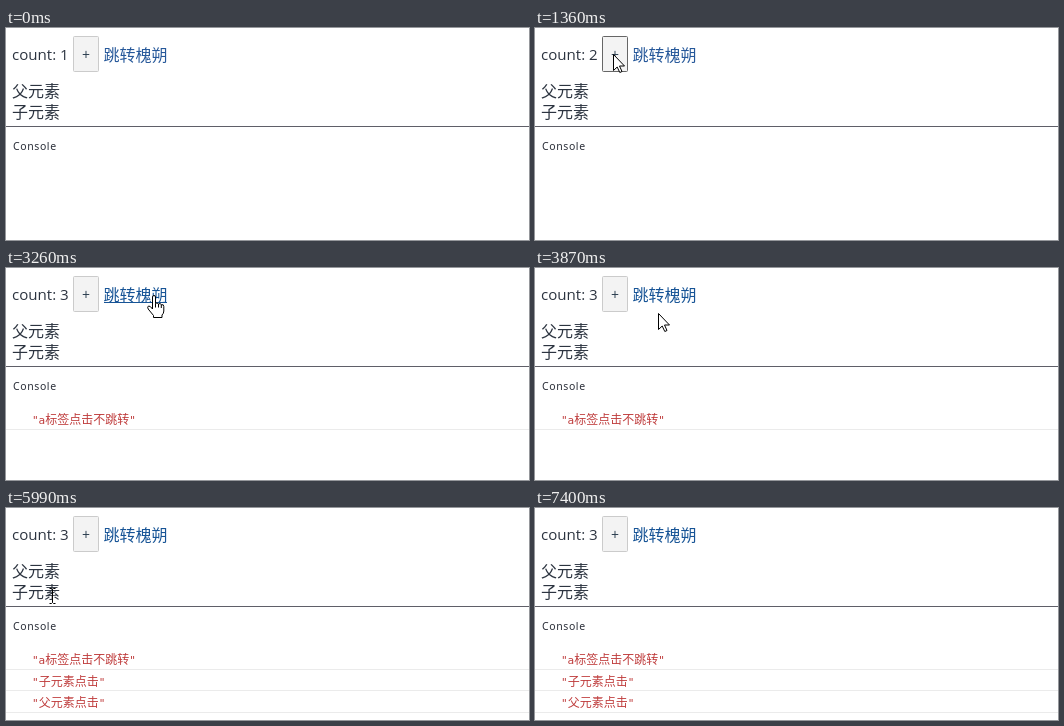
Animation, 523 px wide and 212 px high, one loop 8000 ms. Source, as an HTML page:

```html
<!DOCTYPE html>
<html lang="zh-CN">
<head>
<meta charset="utf-8">
<title>Event modifiers</title>
<style>
  html, body { margin: 0; width: 100%; height: 100%; overflow: hidden; background: #fff; }
  svg { display: block; width: 523px; height: 212px; cursor: default; }
  text { font: 16px "Noto Sans CJK SC", "Noto Sans CJK", sans-serif; fill: #2c3440; }
  .latin { font: 15.1px "Open Sans", "Noto Sans", sans-serif; }
  .plus { font: 14px "Open Sans", "Noto Sans", sans-serif; fill: #2c3e50; text-anchor: middle; }
  .title { font: 500 10.5px "Noto Sans", "Open Sans", sans-serif; letter-spacing: .6px; fill: #2c303a; }
  .log text { font: 11px "DejaVu Sans Mono", monospace; fill: #bf3c3c; }
  .log tspan { font: 12px "Noto Sans CJK SC", "Noto Sans CJK", sans-serif; }
  .log rect { fill: #ebebeb; }
  #cursor path { fill: #fff; stroke: #000; stroke-linejoin: round; }
  #cursor #beam { fill: none; stroke-linejoin: miter; }
</style>
</head>
<body>
<svg viewBox="0 0 523 212">
  <text id="count" class="latin" x="6" y="32">count: 1</text>
  <rect id="button" x="67.5" y="8.5" width="25" height="35" rx="1"/>
  <text class="plus" x="80" y="32">+</text>
  <g id="link">
    <text x="97.5" y="32.5" style="fill: inherit">跳转槐朔</text>
    <rect id="underline" x="98" y="34" width="63" height="1"/>
  </g>
  <text x="6" y="69">父元素</text>
  <text x="6" y="90">子元素</text>

  <rect y="98" width="523" height="1" fill="#5f5f68"/>
  <text class="title" x="7" y="122">Console</text>
  <g id="logs"></g>

  <g id="cursor">
    <path id="arrow" d="M.5 .5V16.5L4.2 13L6.8 18.5L9 17.5L6.5 12H11.5Z"/>
    <path id="hand" d="M-.5 14V2Q-.5 .5 1 .5T2.5 2V8.5Q4 7 5.5 9Q7.2 7.7 8.3 9.7Q10.8 9 10.8 11.5V16Q10.8 18.5 9 20V22.5H.5V20.5L-4.8 14Q-6 12-4.5 11Q-3 10.5-.5 14ZM2.5 8.5V12.5M5.5 9V12.5M8.3 9.7V13"/>
    <path id="beam" d="M-3-7.5H-1L0-6.5L1-7.5H3M0-6.5V6.5M-3 7.5H-1L0 6.5L1 7.5H3"/>
  </g>
</svg>
<script>
const LOOP = 8000;
const $ = id => document.getElementById(id);
const show = (el, on) => { el.style.display = on ? '' : 'none'; };

const messages = [
  { at: 3260, prefix: 'a', text: '标签点击不跳转' },
  { at: 5990, prefix: '', text: '子元素点击' },
  { at: 5990, prefix: '', text: '父元素点击' }
];
$('logs').innerHTML = messages.map(({ prefix, text }, i) => `
  <g class="log">
    <text x="26" y="${156 + 21.5 * i}">"${prefix}<tspan>${text}</tspan>"</text>
    <rect y="${Math.floor(161 + 21.5 * i)}" width="523" height="1"/>
  </g>`).join('');

// Each leg of the pointer's way starts where the one before it ended
const legs = [];
let spot = [452, 191];
function move(start, end, steps, to, via = to, ease = 1) {
  legs.push({ start, end, steps, from: spot, via, to, ease });
  spot = to;
}
move(400, 1150, 12, [78, 26], [190, -80], 2);
move(2300, 2840, 8, [147, 27], [112, 22]);
move(3540, 3610, 2, [151, 27]);
move(3750, 4490, 12, [38.5, 64], [110, 62], 2);
move(5220, 5660, 7, [42.5, 89]);
move(5990, 6780, 12, [98, 75], [67, 83]);
move(6840, 7400, 9, [241, 235], [175, 15]);

function pointer(t) {
  const leg = legs.findLast(l => l.start <= t) || legs[0];
  const done = Math.max(0, Math.min(1, (t - leg.start) / (leg.end - leg.start)));
  const step = 1 + Math.floor(done * (leg.steps - 1) + 1e-6);
  const u = 1 - (1 - step / leg.steps) ** leg.ease;
  const v = 1 - u;
  return [0, 1].map(c => v * v * leg.from[c] + 2 * u * v * leg.via[c] + u * u * leg.to[c]);
}

function render(t) {
  const [x, y] = pointer(t);
  const within = (a, b) => t >= a && t < b;
  const visible = within(400, 7400);
  const overLink = visible && x >= 98 && x <= 161 && y >= 16 && y <= 37;
  const overText = x <= 54 && y >= 54 && y <= 97;

  $('count').textContent = 'count: ' + (t < 1290 ? 1 : t < 2100 ? 2 : 3);
  const pressed = within(1220, 1360) || within(1970, 2100);
  $('button').setAttribute('fill', pressed ? '#e8e8e8' : '#f3f3f3');
  $('button').setAttribute('stroke', within(1220, 3120) ? '#666' : '#cbcbcb');

  $('link').style.fill = t < 3120 ? '#26589a' : '#175496';
  show($('underline'), overLink);
  messages.forEach((m, i) => show($('logs').children[i], t >= m.at));

  show($('cursor'), visible);
  show($('hand'), overLink);
  show($('beam'), overText);
  show($('arrow'), !overLink && !overText);
  const half = overText ? .5 : 0;
  $('cursor').setAttribute('transform', `translate(${Math.round(x - half) + half} ${Math.round(y)})`);
}

const begin = performance.now();
function tick() {
  render((performance.now() - begin) % LOOP);
  requestAnimationFrame(tick);
}
tick();
</script>
</body>
</html>
```
